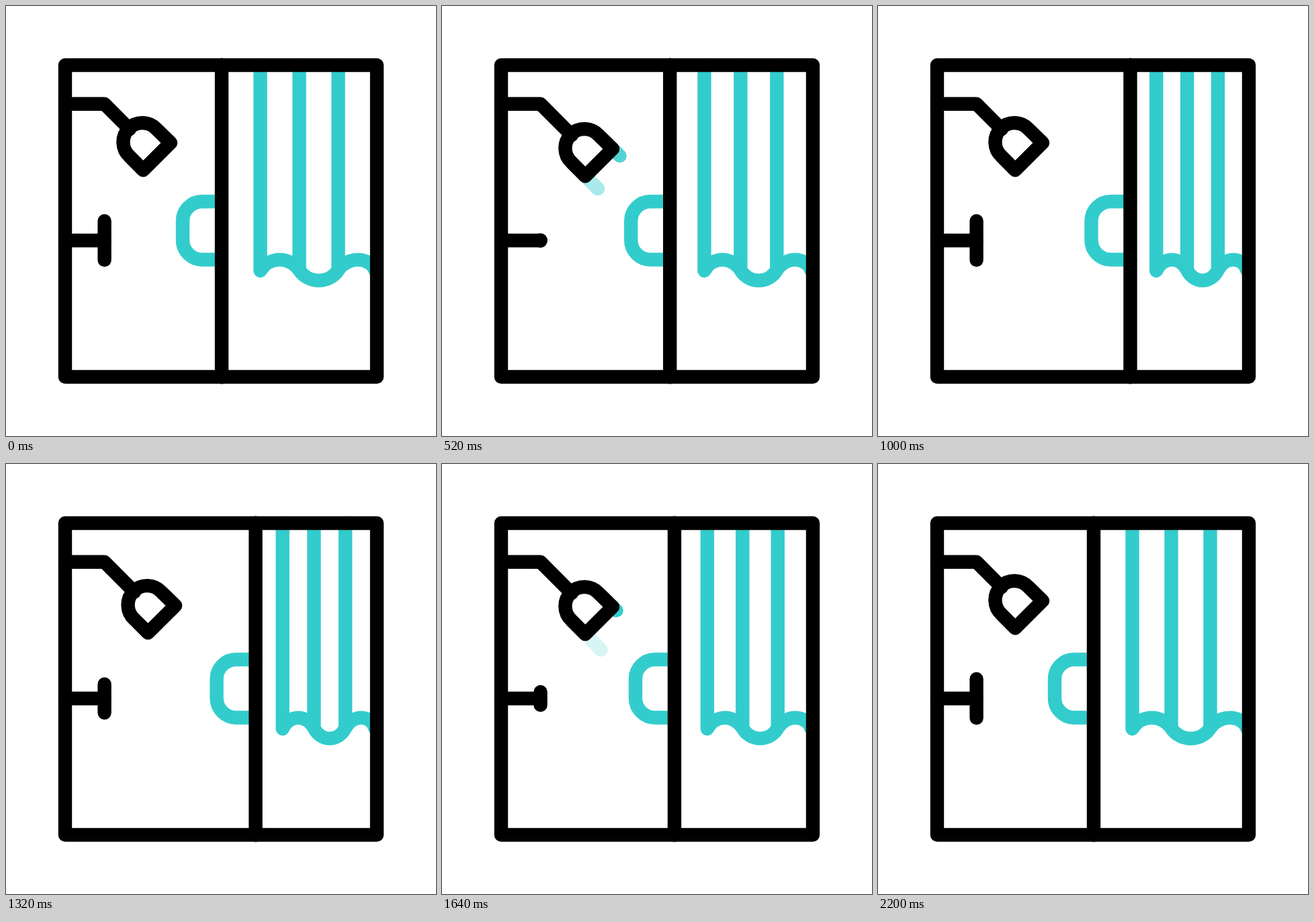
An HTML page for the animation above (2.28 s loop, 640 by 640 pixels).

```html
<!DOCTYPE html>
<html lang="en">
<head>
<meta charset="utf-8">
<title>Shower cabin</title>
<style>
  html, body { margin: 0; width: 100%; height: 100%; overflow: hidden; background: #fff; }
  svg { display: block; width: 100vw; height: 100vh; }
  path { fill: none; stroke-width: 20.4; stroke-linecap: round; stroke-linejoin: round; }
  .teal { stroke: #33cccc; }
  .ink { stroke: #000; }
</style>
</head>
<body>
<svg viewBox="0 0 640 640">
  <path id="curtain" class="teal"/>
  <path id="handle" class="teal" d="M321 291H292a29 29 0 0 0-29 29V348.5a29 29 0 0 0 29 29H321"/>
  <path id="dropA" class="teal"/>
  <path id="dropB" class="teal"/>
  <path id="door" class="ink" d="M321 87.8V552.2"/>
  <path class="ink" d="M88 88H552V552H88Z"/>
  <path id="pipe" class="ink"/>
  <path id="head" class="ink" d="M224.2 183.4A28.6 28.6 0 1 0 183.8 223.8L204.2 244.2L245 203.6Z"/>
  <path class="ink" d="M88 349H146.5"/>
  <path id="tap" class="ink"/>
</svg>
<script>
const LOOP = 2280, STEP = 40, CYCLE = 978, DROP_LIFE = 200;
const $ = id => document.getElementById(id);
const clamp = v => Math.min(1, Math.max(0, v));
const part = (t, from, to) => clamp((t - from) / (to - from));
const smooth = u => u * u * (3 - 2 * u);

// Cubic bezier easing with control points (a, 0) and (b, 1)
function ease(u, a, b) {
  let lo = 0, hi = 1;
  for (let i = 0; i < 30; i++) {
    const p = (lo + hi) / 2, q = 1 - p;
    if (3 * a * p * q * q + 3 * b * p * p * q + p ** 3 < u) lo = p;
    else hi = p;
  }
  return smooth(lo);
}

// Rises, optionally holds, then falls back
const pulse = (t, up, top, fall, end) => smooth(part(t, up, top)) - smooth(part(t, fall, end));

function drawCurtain(shift) {
  const x = v => (v + (549 - v) * 0.00385 * shift).toFixed(2);
  const stripes = [378.5, 436.5, 494.5];
  let d = stripes.map(s => `M${x(s)} 88V393`).join('');
  d += `M${x(378.5)} 394`;
  [...stripes, 552.5].slice(0, 3).forEach((s, i) => {
    const mid = i % 2 ? 408.6 : 377.6;
    const bend = i % 2 ? 402.5 : 384;
    d += `C${x(s + 6)} ${bend} ${x(s + 17)} ${mid} ${x(s + 29)} ${mid}`;
    d += `S${x(s + 52)} ${bend} ${x(Math.min(s + 58, 549))} 393`;
  });
  $('curtain').setAttribute('d', d);
}

function drawDrop(id, x, y, starts, t) {
  const start = starts.find(s => t >= s && t < s + DROP_LIFE);
  const p = start === undefined ? 1 : (t - start) / DROP_LIFE;
  const tip = 28 * p, tail = Math.max(0, tip - 13);
  $(id).setAttribute('d', `M${x + tail} ${y + tail}L${x + tip} ${y + tip}`);
  $(id).setAttribute('opacity', clamp(1.367 - 1.39 * p));
}

function draw(t) {
  const shift = 55 * (ease(part(t, 113, 1106), 0.6, 0.33) - ease(part(t, 1114, 2177), 0.42, 0.5));
  for (const id of ['door', 'handle']) $(id).setAttribute('transform', `translate(${shift} 0)`);
  drawCurtain(shift);

  const c = t % CYCLE;
  const dip = t < 2 * CYCLE ? 9 * pulse(c, 180, 410, 690, 900) : 0;
  const turn = t < 2 * CYCLE ? pulse(c, 238, 545, 545, 845) : 0;
  $('head').setAttribute('transform', `translate(${dip} ${dip})`);
  $('pipe').setAttribute('d', `M88 145.8H146.5L${184 + dip} ${183.4 + dip}`);
  const half = Math.max(0.01, 29 * (1 - turn));
  $('tap').setAttribute('d', `M146.6 ${349 - half}V${349 + half}`);

  drawDrop('dropA', 254, 212.5, [444, 644, 1400, 1600], t);
  drawDrop('dropB', 213, 253, [384, 584, 1472], t);
}

function tick() {
  draw(Math.floor((performance.now() % LOOP) / STEP) * STEP);
  requestAnimationFrame(tick);
}
tick();
</script>
</body>
</html>
```
